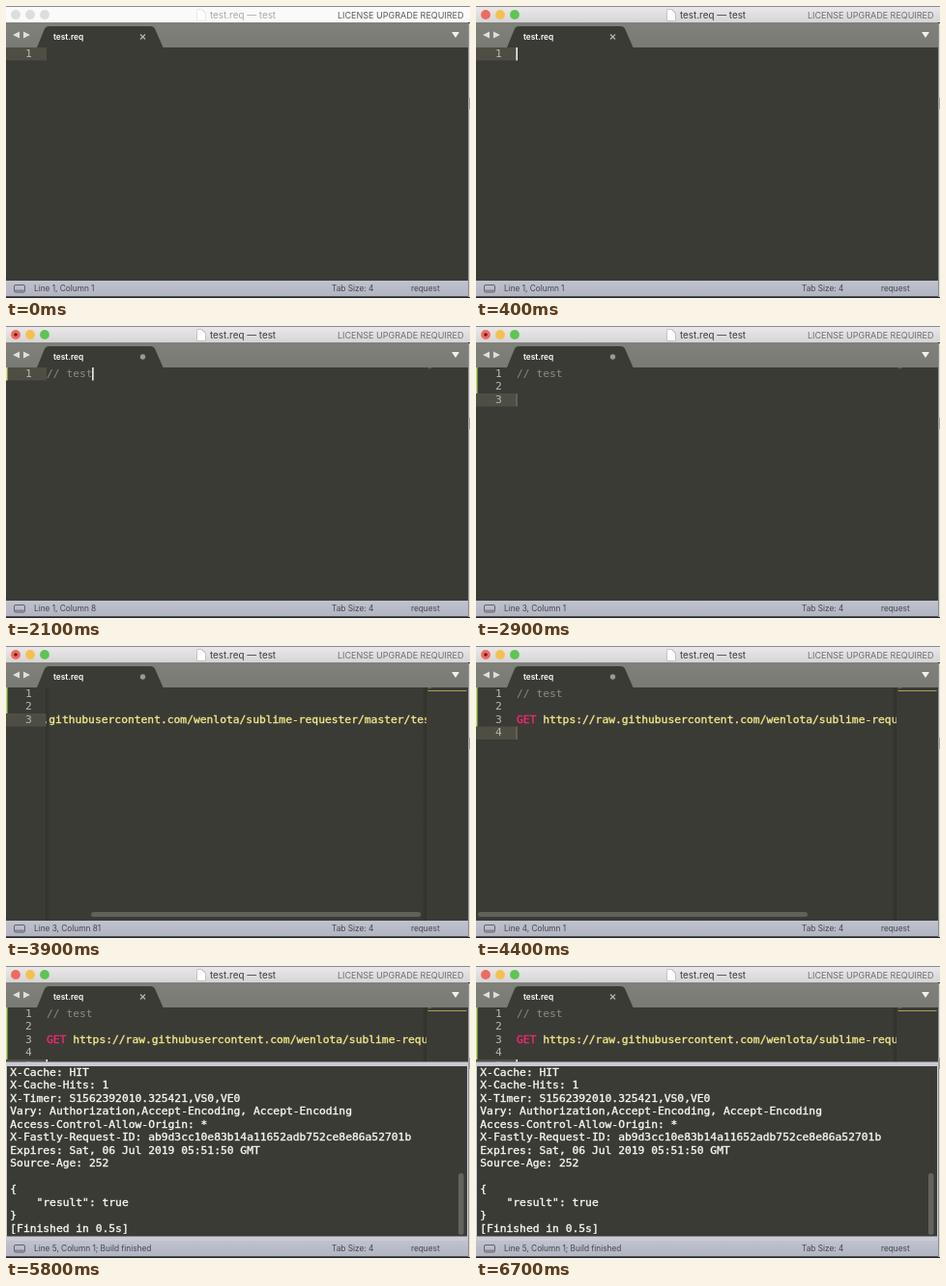
Animation of 480 by 303 pixels, one loop 6800 ms. Source, as an HTML page with a canvas:

```html
<!DOCTYPE html>
<html lang="en">
<head>
<meta charset="utf-8">
<title>test.req</title>
<style>
  html, body { margin: 0; width: 100%; height: 100%; overflow: hidden; background: #3b3b36; }
  canvas { display: block; width: 480px; height: 303px; }
</style>
</head>
<body>
<canvas id="stage" width="480" height="303"></canvas>
<script>
const ctx = document.getElementById('stage').getContext('2d');
const LOOP = 6800, STEP = 100;
const CHAR = 6.8, ROW = 13.5, TEXT_X = 42, TEXT_Y = 43, BASELINE = 9.7;
const MONO = '11.3px "DejaVu Sans Mono", monospace';
const BG = '#3b3b36', WHITE = '#f8f8f2';
const COMMENT = '#8b8a7e', PINK = '#f92672', YELLOW = '#f1e98a';
const URL_TEXT = 'https://raw.githubusercontent.com/wenlota/sublime-requester/master/test.json';

const FOCUS = 400, PASTE = 3600, NEWLINE = 3950, SAVE = 4700;
const PANEL = 4800, BUILD = 5000, OUTPUT = 5400, DONE = 5500;

// Each keystroke: time, inserted text
const KEYS = [
  [800, '/'], [1000, '/'], [1400, ' '],
  [1800, 't'], [1900, 'e'], [2000, 's'], [2100, 't'],
  [2300, '\n'], [2400, '\n'],
  [3000, 'G'], [3100, 'E'], [3200, 'T'], [3400, ' '],
  [PASTE, URL_TEXT], [NEWLINE, '\n'], [4600, '\n'],
];

const OUTPUT_LINES = `GET ${URL_TEXT}
Host: raw.githubusercontent.com
Accept: */*

HTTP/1.1 200 OK
Content-Security-Policy: default-src 'none'; sandbox
Strict-Transport-Security: max-age=31536000
X-Content-Type-Options: nosniff
X-Frame-Options: deny
X-XSS-Protection: 1; mode=block
ETag: "5d1ff0c2"
Content-Type: text/plain; charset=utf-8
Cache-Control: max-age=300
X-Geo-Block-List:
Content-Encoding: gzip
Content-Length: 43
Accept-Ranges: bytes
Date: Sat, 06 Jul 2019 05:46:50 GMT
Via: 1.1 varnish
Connection: keep-alive
X-Served-By: cache
X-Cache: HIT
X-Cache-Hits: 1
X-Timer: S1562392010.325421,VS0,VE0
Vary: Authorization,Accept-Encoding, Accept-Encoding
Access-Control-Allow-Origin: *
X-Fastly-Request-ID: ab9d3cc10e83b14a11652adb752ce8e86a52701b
Expires: Sat, 06 Jul 2019 05:51:50 GMT
Source-Age: 252

{
    "result": true
}
[Finished in 0.5s]`.split('\n');

const clamp = v => Math.max(0, Math.min(1, v));
const progress = (t, start, length) => clamp((t - start) / length);
const easeOut = p => 1 - (1 - p) ** 2;
const sans = (size, weight = 400) => `${weight} ${size}px Inter, sans-serif`;

function rect(x, y, w, h, color) {
  ctx.fillStyle = color;
  ctx.fillRect(x, y, w, h);
}

function round(x, y, w, h, r, color) {
  ctx.fillStyle = color;
  ctx.beginPath();
  ctx.roundRect(x, y, w, h, r);
  ctx.fill();
}

function circle(x, y, r, color) {
  ctx.fillStyle = color;
  ctx.beginPath();
  ctx.arc(x, y, r, 0, 7);
  ctx.fill();
}

function polygon(color, ...points) {
  ctx.fillStyle = color;
  ctx.beginPath();
  points.forEach(([x, y]) => ctx.lineTo(x, y));
  ctx.fill();
}

function text(string, x, y, font, color) {
  ctx.font = font;
  ctx.fillStyle = color;
  ctx.fillText(string, x, y);
}

// Code glyphs carry a hairline outline for a slightly heavier weight
function code(string, x, y, color) {
  text(string, x, y, MONO, color);
  ctx.strokeStyle = color;
  ctx.lineWidth = 0.35;
  ctx.strokeText(string, x, y);
}

function gradient(x0, y0, x1, y1, from, to) {
  const g = ctx.createLinearGradient(x0, y0, x1, y1);
  g.addColorStop(0, from);
  g.addColorStop(1, to);
  return g;
}

function clipped(x, y, w, h, draw) {
  ctx.save();
  ctx.beginPath();
  ctx.rect(x, y, w, h);
  ctx.clip();
  draw();
  ctx.restore();
}

function faded(alpha, draw) {
  ctx.save();
  ctx.globalAlpha = alpha;
  draw();
  ctx.restore();
}

function titleBar(active, edited) {
  rect(0, 0, 480, 17, active ? gradient(0, 0, 0, 17, '#ebe9eb', '#d6d4d6') : '#fafafa');
  rect(0, 0, 480, 1, '#8a8a8a');
  const lights = active ? ['#ed6b60', '#f5c04f', '#5fc454'] : Array(3).fill('#dddddd');
  lights.forEach((color, i) => circle(10 + 15 * i, 9, 4.9, color));
  if (active && edited) circle(10, 9, 1.8, '#7a1512');

  polygon(active ? '#aaaaaa' : '#d8d8d8', [197.5, 3.5], [203, 3.5], [206.5, 7], [206.5, 15.5], [197.5, 15.5]);
  polygon('#ffffff', [198, 4], [202.5, 4], [206, 7.5], [206, 15], [198, 15]);
  text('test.req — test', 211, 13, sans(9.85), active ? '#3c3c3c' : '#a8a8a8');
  text('LICENSE UPGRADE REQUIRED', 343, 13, sans(9), active ? '#707070' : '#5c5c5c');
}

function tabBar(edited) {
  rect(0, 17, 478, 26, gradient(0, 17, 0, 43, '#80817a', '#797a73'));
  polygon('#dededa', [7, 30], [14, 26.5], [14, 33.5]);
  polygon('#dededa', [25, 30], [18, 26.5], [18, 33.5]);
  polygon('#f0f0ec', [461, 27], [469, 27], [465, 33]);

  ctx.fillStyle = BG;
  ctx.beginPath();
  ctx.moveTo(32, 43);
  ctx.lineTo(40, 23.5);
  ctx.quadraticCurveTo(41, 21, 44, 21);
  ctx.lineTo(150, 21);
  ctx.quadraticCurveTo(153, 21, 154, 23.5);
  ctx.lineTo(162.5, 43);
  ctx.fill();
  text('test.req', 49, 34.7, sans(8.3, 600), '#ffffff');
  if (edited) {
    circle(141.5, 32, 2.7, '#9a9a94');
  } else {
    ctx.strokeStyle = '#b4b4ae';
    ctx.lineWidth = 1.3;
    ctx.beginPath();
    ctx.moveTo(139, 29.5); ctx.lineTo(144, 34.5);
    ctx.moveTo(144, 29.5); ctx.lineTo(139, 34.5);
    ctx.stroke();
  }
}

function statusBar(label) {
  rect(0, 285, 478, 16.5, gradient(0, 285, 0, 301, '#c0c2cf', '#b2b4c2'));
  ctx.strokeStyle = '#62636c';
  ctx.lineWidth = 1;
  ctx.beginPath();
  ctx.roundRect(8.5, 289.5, 11, 7.5, 1.5);
  ctx.stroke();
  rect(9, 294.5, 10, 2, '#85868f');
  const font = sans(8.27), color = '#45464d';
  text(label, 29, 296, font, color);
  text('Tab Size: 4', 337, 296, font, color);
  text('request', 419, 296, font, color);
}

// Smooth blink restarting at every keystroke
function caretAlpha(age) {
  const phase = age % 1000;
  return phase < 500 ? 1 - 0.8 * progress(phase, 400, 50)
    : phase < 800 ? 0.2 * (1 - progress(phase, 500, 100))
    : progress(phase, 800, 200);
}

function editor(t, lines, lastKey, bottom) {
  const scroll = 106.5 * (easeOut(progress(t, PASTE - 100, 300)) - easeOut(progress(t, NEWLINE, 250)));
  const current = lines.length - 1;
  const wide = t >= PASTE;

  clipped(0, TEXT_Y, 478, bottom - TEXT_Y, () => {
    rect(0, TEXT_Y + current * ROW, TEXT_X, ROW, '#4e4e45');
    if (lines.join('')) {
      rect(0, TEXT_Y, 1.5, Math.max(1, current) * ROW, current ? '#b5dc72' : '#e8df8a');
    }
    lines.forEach((_, i) => text(i + 1, 20, TEXT_Y + BASELINE + i * ROW, MONO, '#b8b8af'));

    clipped(TEXT_X - 1, TEXT_Y, wide ? 394 : 400, 240, () => {
      lines.forEach((line, i) => {
        const x = TEXT_X - scroll, y = TEXT_Y + BASELINE + i * ROW;
        if (line.startsWith('GET')) {
          code('GET', x, y, PINK);
          code(line.slice(4), x + 4 * CHAR, y, YELLOW);
        } else {
          text(line, x, y, MONO, line.startsWith('//') ? COMMENT : WHITE);
        }
      });
      if (t >= FOCUS) faded(caretAlpha(t - lastKey), () =>
        rect(TEXT_X - scroll + lines[current].length * CHAR - 0.5, TEXT_Y + current * ROW, 1.5, ROW, WHITE));
    });

    if (wide) {
      rect(430, TEXT_Y, 5, 242, gradient(430, 0, 435, 0, 'rgba(0,0,0,0)', 'rgba(0,0,0,.18)'));
      if (scroll > 1) rect(41, TEXT_Y, 5, 242, gradient(41, 0, 46, 0, 'rgba(0,0,0,.18)', 'rgba(0,0,0,0)'));
    }
    lines.forEach((line, i) => {
      const color = line.startsWith('GET ') ? '#aaa158' : '#66665d';
      rect(436.5, 43.2 + i * 1.4, line.length * 0.5, 1, color);
    });

    if (wide) faded(1 - progress(t, OUTPUT, 300), () => {
      const width = t >= PANEL ? 332 : 341;
      round(2 + scroll * 0.808, bottom - (t >= PANEL ? 7.5 : 9), width, 5, 2.5, '#61615b');
      if (t >= PANEL) round(469.5, 47, 5, 32, 2.5, '#6a6a64');
    });
  });
}

function outputPanel(t, top) {
  const inner = top + 4.5, height = 280.5 - inner;
  rect(0, top, 478, 285 - top, '#c9cad3');
  rect(1, inner, 476, height, BG);
  if (t < OUTPUT) return;

  const hidden = OUTPUT_LINES.length - 13;
  const position = easeOut(progress(t, OUTPUT, 300));
  clipped(1, inner, 476, height, () => {
    OUTPUT_LINES.forEach((line, i) =>
      code(line, 4.3, 113.8 + (i - hidden * position) * ROW, WHITE));
    round(468, 106 + 109 * position, 5.5, 64, 2.7, '#64645e');
  });
}

function desktop() {
  rect(0, 301.5, 480, 1.5, '#26262a');
  rect(478, 18, 1, 284, '#8e8e8c');
  rect(479, 18, 1, 284, '#dcdcdc');
  rect(478, 95, 2, 12, '#a0a0a0');
}

function render(t) {
  const typed = KEYS.filter(([time]) => time <= t);
  const lines = typed.map(key => key[1]).join('').split('\n');
  const lastKey = typed.length ? typed[typed.length - 1][0] : FOCUS;
  const edited = typed.length > 0 && t < SAVE;
  const panelTop = 285 - 185.5 * progress(t, PANEL - 100, 200);
  const build = t >= DONE ? '; Build finished' : t >= BUILD ? '; Building' : '';

  rect(0, 0, 480, 303, BG);
  editor(t, lines, lastKey, t >= PANEL ? panelTop : 285);
  if (t >= PANEL) outputPanel(t, panelTop);
  titleBar(t >= FOCUS, edited);
  tabBar(edited);
  statusBar(`Line ${lines.length}, Column ${lines[lines.length - 1].length + 1}${build}`);
  desktop();
}

const start = performance.now();
function frame() {
  const elapsed = (performance.now() - start) % LOOP;
  render(Math.floor(elapsed / STEP) * STEP);
  requestAnimationFrame(frame);
}
frame();
</script>
</body>
</html>
```
